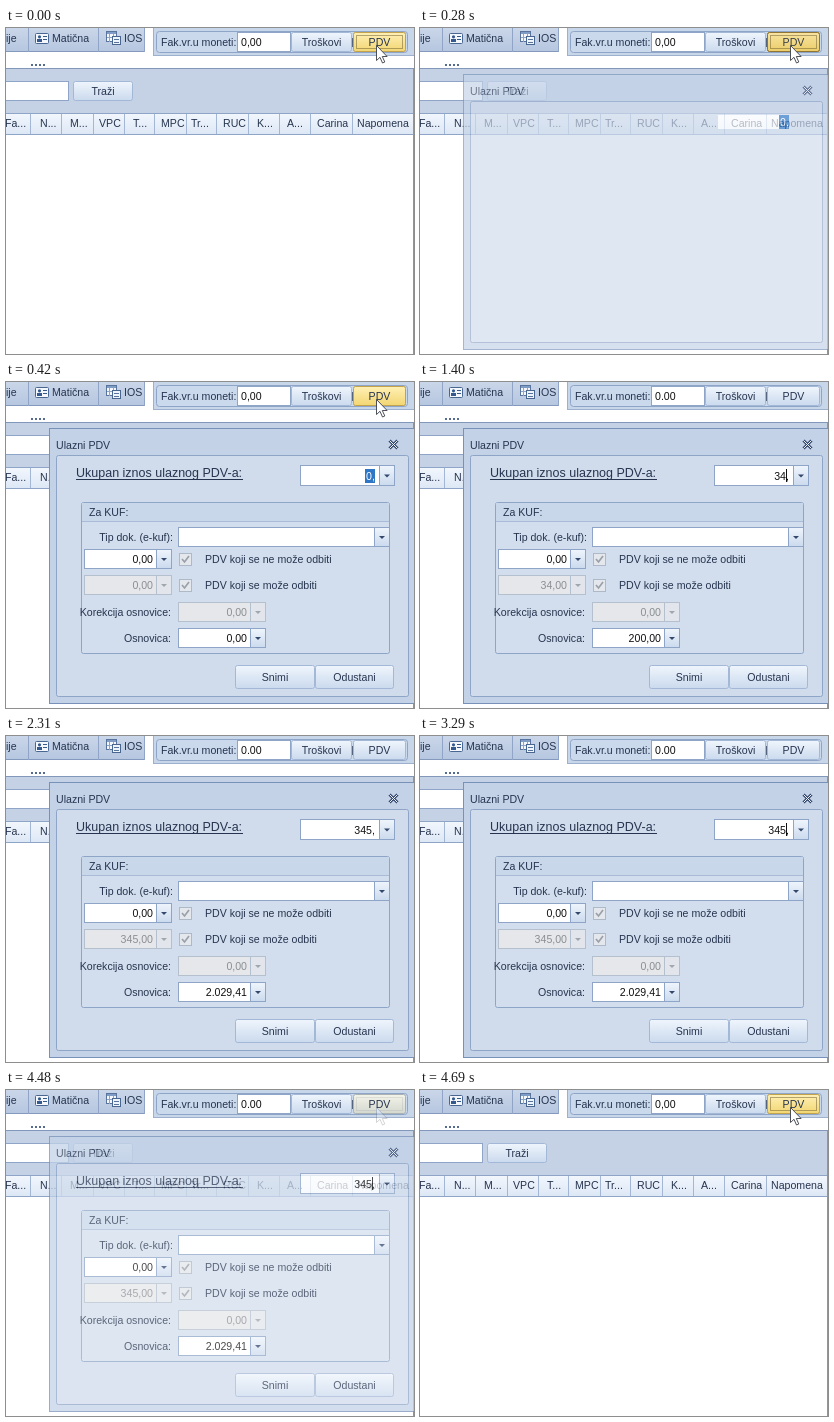
Write an HTML page that moves like this. It is 408 px wide and 326 px high and loops after 5.04 s.

```html
<!DOCTYPE html>
<html lang="hr">
<head>
<meta charset="utf-8">
<title>Ulazni PDV</title>
<style>
html, body { margin: 0; width: 100%; height: 100%; overflow: hidden; background: #fff; }
svg { display: block; }
text { font-family: "Liberation Sans", Arial, sans-serif; white-space: pre; }
</style>
</head>
<body>
<svg id="stage" width="408" height="326" viewBox="0 0 408 326"></svg>
<script>
const LOOP = 5040, STEP = 70;
const INK = '#26344f', EDGE = '#8ea5c7';

// Markup helpers; outlined boxes are aligned to whole pixels.
const fill = (x, y, w, h, color) => `<rect x="${x}" y="${y}" width="${w}" height="${h}" fill="${color}"/>`;
const box = (x, y, w, h, color, edge = EDGE, r = 0) =>
  `<rect x="${x + .5}" y="${y + .5}" width="${w - 1}" height="${h - 1}" rx="${r}" fill="${color}" stroke="${edge}"/>`;
const text = (x, y, s, { size = 10.6, color = INK, anchor = 'start', id = '', extra = '' } = {}) =>
  `<text x="${x}" y="${y}" font-size="${size}" fill="${color}" text-anchor="${anchor}" ${id && `id="${id}"`} ${extra}>${s}</text>`;
const path = (d, color, extra = '') => `<path d="${d}" fill="${color}" ${extra}/>`;
const gradient = (id, top, bottom) =>
  `<linearGradient id="${id}" x2="0" y2="1"><stop stop-color="${top}"/><stop offset="1" stop-color="${bottom}"/></linearGradient>`;
const group = (id, content) => `<g id="${id}">${content}</g>`;

const button = (x, y, w, h, label, paint = 'url(#face)', edge = '#a3b8d6') =>
  box(x, y, w, h, paint, edge, 2) + text(x + w / 2, y + h / 2 + 4, label, { anchor: 'middle' });

function combo(x, y, w, h, id, value, disabled) {
  const edge = disabled ? '#b5c0cf' : EDGE, split = x + w - 16;
  return box(x, y, w, h, disabled ? '#e5e7ea' : '#fff', edge) +
    box(split, y, 16, h, disabled ? '#e2e6ec' : 'url(#face)', edge) +
    path(`M${split + 5} ${y + h / 2 - 1}h6l-3 3z`, disabled ? '#a0a6ae' : '#34486e') +
    (id ? text(split - 3, y + h / 2 + 4, value, { id, anchor: 'end', color: disabled ? '#8b8e93' : '#111' }) : '');
}

const checkbox = (y, label) =>
  box(173, y, 13, 13, '#e4e7ec', '#adb8c8') +
  path(`M176 ${y + 6}l2.5 3l4.5-6`, 'none', 'stroke="#9aa0aa" stroke-width="1.7"') +
  text(199, y + 10, label);

function toolbar() {
  const cardIcon = box(29, 5, 14, 11, '#f4f8fd', '#48668f', 1) +
    '<circle cx="33.5" cy="8.8" r="1.6" fill="#36598d"/>' + fill(31, 11, 5, 3, '#36598d') +
    fill(37, 8, 4, 1, '#36598d') + fill(37, 11, 4, 1, '#36598d');
  const gridIcon = box(100, 3, 11, 11, '#f4f8fd', '#58739c') + fill(101, 4, 9, 2, '#7f9cc6') +
    path('M103.5 6v8M107.5 6v8M101 9.5h9', 'none', 'stroke="#8ea5c7"') +
    box(106, 8, 9, 9, '#eef4fb', '#48668f') + path('M108 11.5h5M108 14.5h5', 'none', 'stroke="#58739c"');
  return fill(0, 0, 139, 24, 'url(#tab)') + fill(0, 23, 139, 1, '#8399bd') +
    [22, 92, 138].map(x => fill(x, 0, 1, 24, '#8fa4c6')).join('') +
    text(0, 14, 'ije') + cardIcon + text(46, 14, 'Matična') + gridIcon + text(118, 14, 'IOS') +
    fill(147, 0, 261, 28, '#c8d6ea') + fill(147, 0, 1, 28, '#9db1cf') + fill(147, 27, 261, 1, '#9db1cf') +
    box(150, 3, 252, 22, '#cbd9ed', '#8fa5c8', 3) +
    text(155, 18, 'Fak.vr.u moneti:') + box(231, 4, 54, 20, '#fff') +
    text(235, 18, '0,00', { id: 'amount', color: '#111' }) +
    button(285, 4, 61, 20, 'Troškovi') + fill(346, 10, 1, 9, '#55647f');
}

function page() {
  const columns = [[-1, 'Fa...'], [34, 'N...'], [64, 'M...'], [93, 'VPC'], [127, 'T...'], [155, 'MPC'],
    [185, 'Tr...'], [217, 'RUC'], [251, 'K...'], [281, 'A...'], [311, 'Carina'], [351, 'Napomena']];
  const splits = [24, 55, 87, 118, 148, 180, 210, 242, 273, 304, 346];
  return fill(0, 0, 408, 326, '#fff') + toolbar() +
    [25, 29, 33, 37].map(x => fill(x, 36, 2, 2, '#566b90')).join('') +
    fill(0, 40, 408, 46, '#c5d2e6') + fill(0, 40, 408, 1, '#8298bb') +
    box(-2, 53, 65, 20, '#fff') + button(67, 53, 60, 20, 'Traži') +
    fill(0, 85, 408, 22, 'url(#head)') + fill(0, 85, 408, 1, EDGE) + fill(0, 106, 408, 1, EDGE) +
    splits.map(x => fill(x, 86, 1, 20, '#a3b7d5')).join('') +
    columns.map(([x, s]) => text(x, 99, s)).join('') + fill(407, 40, 1, 286, '#8298bb');
}

function dialog() {
  const form = text(70, 95, 'Ukupan iznos ulaznog PDV-a:', { size: 12.5 }) + fill(70, 97, 167, 1, INK) +
    combo(294, 83, 95, 21) +
    box(75, 120, 309, 152, '#d2deed', EDGE, 2) + fill(76, 121, 307, 18, '#c8d7ea') + fill(76, 139, 307, 1, '#a9bbd6') +
    text(83, 134, 'Za KUF:') +
    text(167, 159, 'Tip dok. (e-kuf):', { anchor: 'end' }) + combo(172, 145, 212, 20) +
    combo(78, 167, 88, 20, 'fixed', '0,00') + checkbox(171, 'PDV koji se ne može odbiti') +
    combo(78, 193, 88, 20, 'deductible', '0,00', true) + checkbox(197, 'PDV koji se može odbiti') +
    text(165, 234, 'Korekcija osnovice:', { anchor: 'end' }) + combo(172, 220, 88, 20, 'correction', '0,00', true) +
    text(165, 260, 'Osnovica:', { anchor: 'end' }) + combo(172, 246, 88, 20, 'base', '0,00') +
    button(229, 283, 80, 24, 'Snimi') + button(309, 283, 79, 24, 'Odustani');
  return box(43, 46, 366, 276, '#c3d2e7', '#7791b8') + text(50, 67, 'Ulazni PDV') +
    path('M383.5 58.5l8 8M391.5 58.5l-8 8', 'none', 'stroke="#34486e" stroke-width="3"') +
    path('M383.5 58.5l8 8M391.5 58.5l-8 8', 'none', 'stroke="#e9f0f9" stroke-width="1"') +
    box(50, 73, 353, 242, '#d0dcec', EDGE, 2) + group('form', form) +
    fill(298, 87, 71, 14, '#fff') + group('selection', fill(359, 87, 10, 14, '#2f76c4')) +
    text(366, 98, '0', { id: 'typed', anchor: 'end', color: '#111' }) +
    text(366, 98, ',', { id: 'comma', color: '#111' }) + group('caret', fill(366, 87, 1, 13, '#111'));
}

const hover = button(347, 4, 53, 20, 'PDV', 'url(#gold)', '#c3a24d') +
  group('press', box(347, 4, 53, 20, 'rgba(190,140,30,.12)', '#8f7434', 2)) +
  group('focus', box(350, 7, 47, 14, 'none', '#6b5b2c').replace('/>', ' stroke-dasharray="1 1"/>')) +
  path('M370.5 17.5v15l3.5-3.2l2.5 5.7l2.3-1l-2.5-5.5h4.8z', '#fff', 'stroke="#3b3f48" stroke-width=".9"');

document.getElementById('stage').innerHTML =
  gradient('face', '#eff5fc', '#cbdaee') + gradient('gold', '#fff0b4', '#f2d673') +
  gradient('tab', '#cad6e9', '#b5c6df') + gradient('head', '#f3f7fd', '#dce7f5') +
  page() + button(347, 4, 53, 20, 'PDV') + group('hover', hover) + group('dialog', dialog());

const $ = Object.fromEntries([...document.querySelectorAll('g[id], text[id]')].map(el => [el.id, el]));
const between = (t, a, b) => t >= a && t < b;
const ramp = (t, a, b) => Math.min(1, Math.max(0, (t - a) / (b - a)));
const show = (el, on) => el.setAttribute('opacity', +on);
const money = n => n.toFixed(2).replace('.', ',').replace(/\B(?=(\d{3})+,)/g, '.');
const typedAt = t => t < 980 ? 0 : t < 1260 ? 3 : t < 1610 ? 34 : 345;

function draw(now) {
  const t = Math.floor(now % LOOP / STEP) * STEP;
  const closing = ramp(t, 4410, 4690);
  const vat = typedAt(t - STEP), selected = t < 980;

  show($.dialog, ramp(t, 140, 350) * (1 - closing));
  show($.form, t >= 420);
  show($.hover, t < 4410 ? 1 - ramp(t, 560, 700) : closing);
  show($.focus, t < 420 || t > 4410);
  show($.press, between(t, 70, 420));

  show($.selection, selected);
  show($.caret, !selected && !between(t, 2240, 2800) && !between(t, 3360, 3850));
  $.typed.textContent = typedAt(t);
  for (const el of [$.typed, $.comma]) el.setAttribute('fill', selected ? '#fff' : '#111');

  $.deductible.textContent = money(vat);
  $.base.textContent = money(vat / .17);
  $.amount.textContent = between(t, 1260, 4620) ? '0.00' : '0,00';
  requestAnimationFrame(() => draw(performance.now()));
}
draw(0);
</script>
</body>
</html>
```
